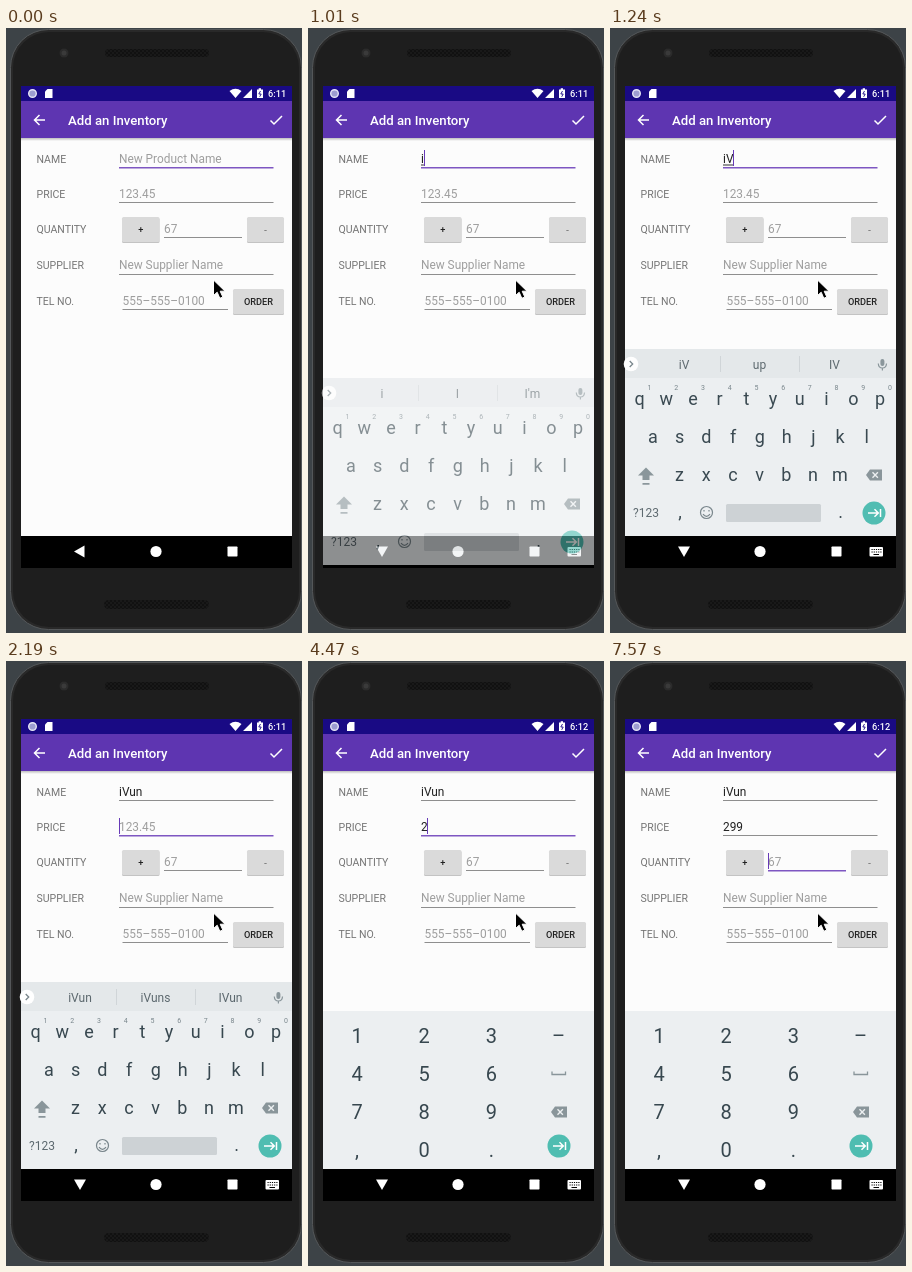
These frames come from a looping animation (296 by 605 pixels, 8000 ms). An HTML page:

```html
<!DOCTYPE html>
<html lang="en">
<head>
<meta charset="utf-8">
<title>Add an Inventory</title>
<style>
  html, body { margin: 0; width: 100%; height: 100%; overflow: hidden; background: #3d4347; }
  svg { display: block; width: 296px; height: 605px; font-family: Roboto, sans-serif; }
  .label { font-size: 10.54px; fill: #757575; }
  .value { font-size: 11.86px; }
  .button { font-size: 9.2px; font-weight: 500; text-anchor: middle; fill: #222; }
  .key { font-size: 18px; fill: #37474f; text-anchor: middle; }
  .digit { font-size: 20px; }
  .small { font-size: 12px; fill: #5c686e; }
  .super { font-size: 7px; fill: #78858b; }
  .line { fill: none; stroke: #fff; stroke-width: 1.5; }
</style>
</head>
<body>
<svg id="stage" viewBox="0 0 296 605">
  <defs>
    <pattern id="mesh" width="4" height="4" patternUnits="userSpaceOnUse">
      <rect width="4" height="4" fill="#191919"/>
      <circle cx="1" cy="1" r=".8" fill="#050505"/><circle cx="3" cy="3" r=".8" fill="#050505"/>
    </pattern>
    <linearGradient id="shade" x2="0" y2="1">
      <stop stop-color="#000" stop-opacity=".25"/><stop offset="1" stop-color="#000" stop-opacity="0"/>
    </linearGradient>
    <g id="erase">
      <path d="M-8 0L-4-5.5H8V5.5H-4Z" fill="#89959a"/>
      <path d="M-1.5-2.7L3.9 2.7M3.9-2.7L-1.5 2.7" stroke="#eceff1" stroke-width="1.4"/>
    </g>
    <g id="next">
      <circle r="11.5" fill="#4fbdb1"/>
      <path class="line" d="M-6 0H4M.5-3.8L4.3 0L.5 3.8M6.5-4V4"/>
    </g>
  </defs>

  <!-- Phone -->
  <rect x="4.5" y="1.5" width="291" height="600" rx="38" fill="#292929" stroke="#545759"/>
  <rect x="7" y="4" width="286" height="595" rx="36" fill="#1e1e1e"/>
  <circle cx="58" cy="25" r="4.5" fill="#2b2b2b"/><circle cx="58" cy="25" r="2.5" fill="#3a3a3a"/>
  <rect x="99" y="21" width="104" height="8" rx="4" fill="url(#mesh)"/>
  <rect x="98" y="572" width="105" height="9" rx="4.5" fill="url(#mesh)"/>

  <!-- Status bar and toolbar -->
  <rect x="15" y="58" width="271" height="482" fill="#fcfcfc"/>
  <rect x="15" y="58" width="271" height="15" fill="#190a84"/>
  <circle cx="26.5" cy="65.5" r="3.8" fill="#9d9dd0" stroke="#e6e6f5" stroke-width="1.4"/>
  <path d="M41.5 61H46.5V70H39V63.5Z" fill="#fff"/>
  <path d="M223.5 63Q229.5 58.5 235.5 63L229.5 70Z M246 61V70H237Z" fill="#fff"/>
  <path d="M251 61.5H252.7V60.3H255V61.5H257V70H251Z" fill="#fff"/>
  <path d="M254.5 63L252.8 66H255.2L253.7 68.8" fill="none" stroke="#190a84" stroke-width=".9"/>
  <text id="clock" x="262" y="69" font-size="9.2" font-weight="500" fill="#fff"></text>
  <rect x="15" y="73" width="271" height="37" fill="#5e35b1"/>
  <rect x="15" y="110" width="271" height="3" fill="url(#shade)"/>
  <path class="line" d="M39 92H28.8M33.5 87L28.5 92L33.5 97M264.5 92.5L268 96L276 88"/>
  <text x="62" y="97" font-size="13.2" font-weight="500" fill="#fff">Add an Inventory</text>

  <g id="form"></g>
  <rect id="compose" x="113" y="136.5" height="1" fill="#333"/>
  <rect id="caret" width="1" height="16" fill="#673ab7"/>

  <!-- Navigation bar -->
  <rect x="15" y="508" width="271" height="32" fill="#000"/>
  <path id="back" fill="#fff"/>
  <circle cx="150" cy="523.5" r="5.6" fill="#fff"/>
  <rect x="221.5" y="518.5" width="10" height="10" rx=".7" fill="#fff"/>
  <g id="switcher">
    <rect x="259.5" y="519" width="13.5" height="9.5" rx="1" fill="#fff"/>
    <path d="M261.5 521.5H271.5M261.5 524H271.5" stroke="#000" stroke-dasharray="1.2 1"/>
    <path d="M263.5 526.5H269" stroke="#000"/>
  </g>

  <g id="letters">
    <rect x="15" y="321" width="271" height="187" fill="#eceff1"/>
    <rect x="15" y="321" width="271" height="29" fill="#e4e8ea"/>
    <path d="M110.5 328V344M189.5 328V344" stroke="#d0d5d8"/>
    <circle cx="21" cy="336" r="7.3" fill="#fff"/>
    <path d="M19.7 333L22.7 336L19.7 339" fill="none" stroke="#78858b" stroke-width="1.3"/>
    <rect x="270.4" y="331" width="4" height="7" rx="2" fill="#89959a"/>
    <path d="M268.3 335.5Q268.5 340 272.4 340T276.5 335.5M272.4 340V342.5" fill="none" stroke="#89959a" stroke-width="1.2"/>
    <path d="M36 439.5L44 447.5H39.5V452H32.5V447.5H28Z M32.5 455H39.5V456.7H32.5Z" fill="#89959a"/>
    <use href="#erase" x="264" y="447"/>
    <g fill="none" stroke="#78858b" stroke-width="1.2">
      <circle cx="96.5" cy="484.5" r="6"/>
      <path d="M93 486.2Q96.5 490.5 100 486.2M94 482V483.6M99 482V483.6"/>
    </g>
    <rect x="116" y="476" width="95" height="18" rx="1.5" fill="#cdd2d5"/>
    <use href="#next" x="264" y="485"/>
  </g>

  <g id="digits">
    <rect x="15" y="350" width="271" height="158" fill="#eceff1"/>
    <path d="M244 410.5V413.5H257.5V410.5" fill="none" stroke="#89959a" stroke-width="1.3"/>
    <use href="#erase" x="251" y="451"/>
    <use href="#next" x="251" y="485"/>
  </g>

  <path d="M207.5 252V267.5L211.2 264.2L213.8 270.3L216.8 269L214.2 263.2H219Z" fill="#000" stroke="#fff"/>
</svg>

<script>
const byId = id => document.getElementById(id);

function add(parent, tag, attrs, content = '') {
  const node = document.createElementNS('http://www.w3.org/2000/svg', tag);
  for (const key in attrs) node.setAttribute(key, attrs[key]);
  node.textContent = content;
  return parent.appendChild(node);
}
const write = (parent, content, x, y, cls) =>
  add(parent, 'text', { x, y, class: cls }, content);

const [form, letters, digits, caret, compose] =
  ['form', 'letters', 'digits', 'caret', 'compose'].map(byId);

// label, hint, left, right, baseline, underline
const fields = [
  ['NAME', 'New Product Name', 113, 267.5, 134.5, 139],
  ['PRICE', '123.45', 113, 267.5, 169.5, 174],
  ['QUANTITY', '67', 158, 236, 205, 209],
  ['SUPPLIER', 'New Supplier Name', 113, 267.5, 241, 246],
  ['TEL NO.', '555–555–0100', 116.5, 222, 276.5, 281]
].map(([label, hint, left, right, base, under]) => {
  write(form, label, 30.5, base, 'label');
  return {
    hint, left, base,
    text: write(form, hint, left, base, 'value'),
    rule: add(form, 'rect', { x: left, y: under, width: right - left })
  };
});

function button(label, x, y, width, color) {
  add(form, 'rect', { x, y: y + 1, width, height: 25, rx: 1.5, fill: '#c3c3c3' });
  add(form, 'rect', { x, y, width, height: 25, rx: 1.5, fill: '#dadada' });
  write(form, label, x + width / 2, y + 15.7, 'button').style.fill = color;
}
button('+', 116, 189, 37.5, '#222');
button('-', 241, 189, 37, '#777');
button('ORDER', 227, 261, 51, '#222');

const pitch = 26.72;
[['qwertyuiop', 29.5, 377], ['asdfghjkl', 43, 415], ['zxcvbnm', 69.5, 453]].forEach(([row, x, y]) =>
  [...row].forEach((c, i) => write(letters, c, x + i * pitch, y, 'key')));
[...'1234567890'].forEach((c, i) => write(letters, c, 39.5 + i * pitch, 362, 'key super'));
write(letters, '?123', 36, 489, 'key small');
write(letters, ',', 70, 490, 'key');
write(letters, '.', 230.5, 490, 'key');
const suggestions = [74, 149.5, 224.5].map(x => write(letters, '', x, 340.5, 'key small'));

['123–', '456', '789', ',0.'].forEach((row, r) =>
  [...row].forEach((c, i) => write(digits, c, 49 + i * 67.2, 382 + r * 38, 'key digit')));

const nameSteps = [[0, ''], [1010, 'i', 'i', 'I', "I'm"], [1240, 'iV', 'iV', 'up', 'IV'],
  [1540, 'iVu', 'iVu', 'IVu', 'iVun'], [1840, 'iVun', 'iVun', 'iVuns', 'IVun']];
const priceSteps = [[0, ''], [4470, '2'], [5360, '29'], [5590, '299']];
const blinks = [480, 950, 1010, 2730, 3210, 3750, 4230, 4940, 5360, 6070, 6550, 7090, 7570];
const current = (steps, t) => steps.filter(s => s[0] <= t).pop();
const show = (node, visible) => node.setAttribute('display', visible ? 'inline' : 'none');

function render(t) {
  const [, name, ...words] = current(nameSteps, t);
  const values = [name, current(priceSteps, t)[1], '', '', ''];
  const focus = t < 2190 ? 0 : t < 6550 ? 1 : 2;
  const typing = t >= 1010;

  fields.forEach((f, i) => {
    f.text.textContent = values[i] || f.hint;
    f.text.setAttribute('fill', values[i] ? '#212121' : '#9e9e9e');
    f.rule.setAttribute('height', i === focus ? 1.5 : 1);
    f.rule.setAttribute('fill', i === focus ? '#7e57c2' : '#8e8e8e');
  });
  if (t < 1010 && t >= 950) fields[0].text.textContent = fields[0].hint;

  const field = fields[focus];
  const length = values[focus] ? field.text.getComputedTextLength() : 0;
  caret.setAttribute('x', Math.round(field.left + length - .3));
  caret.setAttribute('y', Math.round(field.base - 12.6));
  show(caret, blinks.filter(b => b <= t).length % 2);
  compose.setAttribute('width', length);
  show(compose, focus === 0 && name);

  // The keyboard slides up and fades in, in 50 ms steps
  const left = 1 - Math.min(1, Math.max(0, Math.floor((t - 1010) / 50) / 5));
  letters.setAttribute('transform', `translate(0 ${29 * left ** 5})`);
  letters.setAttribute('opacity', 1 - .4 * left ** 2);
  show(letters, typing && t < 2250);
  show(digits, t >= 2250);
  suggestions.forEach((s, i) => s.textContent = words[i] || '');

  byId('back').setAttribute('d', typing ? 'M68 518.5H80L74 529Z' : 'M68 523.5L78.5 517.5V529.5Z');
  show(byId('switcher'), typing);
  byId('clock').textContent = t < 2910 ? '6:11' : '6:12';
}

function tick() {
  render(performance.now() % 8000);
  requestAnimationFrame(tick);
}
tick();
</script>
</body>
</html>
```
